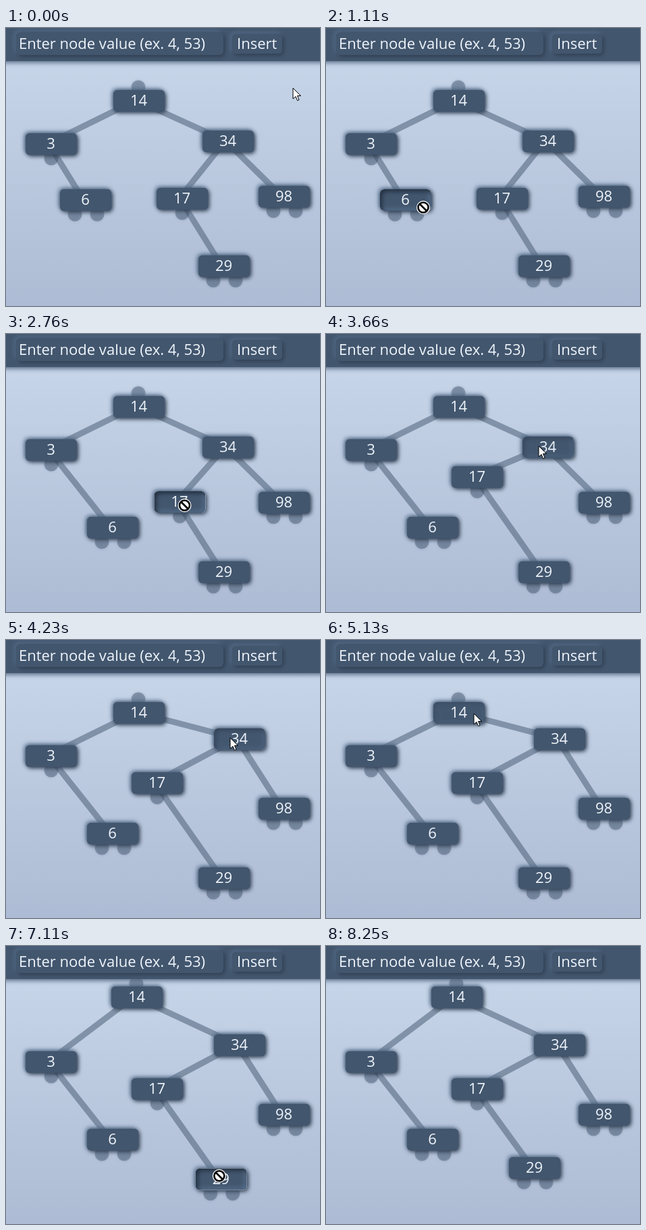
Recreate the animation shown at these times as an HTML page with a canvas. Size 465 by 412 pixels, loop 8.85 s.

```html
<!DOCTYPE html>
<html>
<head>
<meta charset="utf-8">
<style>
html, body { margin: 0; width: 100%; height: 100%; overflow: hidden; }
canvas { display: block; }
</style>
</head>
<body>
<canvas id="stage" width="465" height="412"></canvas>
<script>
const LOOP = 8850, W = 465, H = 412;
const BASE = '#42566e', LIGHT = '#57718f', DARK = '#2b394b';
const c = document.getElementById('stage').getContext('2d');

// Node centres at the start of the loop; ports are x offsets below the node.
const nodes = {
  14: { x: 197, y: 108, ports: [] },
  3: { x: 67, y: 172, parent: 14, ports: [0] },
  34: { x: 329, y: 168, parent: 14, ports: [] },
  6: { x: 118, y: 255, parent: 3, ports: [-16, 17] },
  17: { x: 261, y: 253, parent: 34, ports: [0] },
  98: { x: 412, y: 250, parent: 34, ports: [-16, 17] },
  29: { x: 323, y: 353, parent: 17, ports: [-16, 17] }
};

const drags = [
  { id: 6, hover: 800, press: 930, start: 1140, end: 1680, release: 1700, dx: 40, dy: 32 },
  { id: 17, hover: 1920, press: 2520, start: 2640, end: 3270, release: 3290, dx: -37, dy: -41 },
  { id: 34, hover: 3570, press: 3720, start: 3800, end: 4150, release: 4170, dx: 17, dy: -21 },
  { id: 14, hover: 5080, press: 5160, start: 5190, end: 5430, release: 5880, dx: -3, dy: -32 },
  { id: 29, hover: 6720, press: 6850, start: 6980, end: 7340, release: 7560, dx: -14, dy: -24 }
];

// Pointer moves: start, end, target x, y and an optional bend point.
const moves = [
  [10, 840, 136, 260, 330, 400],
  [960, 1110, 144, 266],
  [1140, 1680, 184, 298],
  [1700, 1800, 191, 278],
  [1810, 1980, 245, 250],
  [1990, 2370, 268, 258],
  [2640, 3270, 231, 217],
  [3390, 3640, 315, 166],
  [3800, 4150, 332, 145],
  [4300, 5130, 219, 109],
  [5190, 5430, 216, 77],
  [6160, 6850, 320, 348],
  [6980, 7340, 306, 324],
  [7840, 8250, 472, 102]
];

const ramp = (t, a, b) => Math.min(1, Math.max(0, (t - a) / (b - a)));
const ease = (t, a, b) => { const u = ramp(t, a, b); return u * u * (3 - 2 * u); };

function pointerAt(t) {
  let x = 425, y = 89;
  for (const [a, b, tx, ty, bx = (x + tx) / 2, by = (y + ty) / 2] of moves) {
    if (t < a) break;
    const u = ease(t, a, b), v = 1 - u;
    x = v * v * x + 2 * u * v * bx + u * u * tx;
    y = v * v * y + 2 * u * v * by + u * u * ty;
    if (t < b) break;
  }
  return { x, y };
}

function layoutAt(t) {
  const layout = {};
  for (const id in nodes) layout[id] = { ...nodes[id], sunk: 0 };
  for (const d of drags) {
    const n = layout[d.id], u = ease(t, d.start, d.end);
    n.x += d.dx * u;
    n.y += d.dy * u;
    n.sunk = (ramp(t, d.hover, d.hover + 120) + ramp(t, d.press, d.press + 120)) / 2
      * (1 - ramp(t, d.release, d.release + 110));
  }
  return layout;
}

function shadow(color, offset, blur) {
  c.shadowColor = color;
  c.shadowOffsetX = c.shadowOffsetY = offset;
  c.shadowBlur = blur;
}

function roundRect(x, y, w, h, r) {
  c.beginPath();
  c.roundRect(x, y, w, h, r);
}

function raised(x, y, w, h, r, blur) {
  c.save();
  c.fillStyle = BASE;
  roundRect(x, y, w, h, r);
  for (const [color, offset] of [[LIGHT, -2], [DARK, 2]]) {
    shadow(color, offset, blur);
    c.fill();
  }
  c.restore();
}

function inset(x, y, w, h, r, amount) {
  c.save();
  c.globalAlpha = amount;
  roundRect(x, y, w, h, r);
  c.clip();
  c.beginPath();
  c.rect(x - 30, y - 30, w + 60, h + 60);
  c.roundRect(x, y, w, h, r);
  for (const [color, offset] of [[LIGHT, -3], ['#1f2b3b', 3]]) {
    shadow(color, offset, 7);
    c.fill('evenodd');
  }
  c.restore();
}

function label(text, x, y, align) {
  c.fillStyle = '#f0f5fb';
  c.font = '22px "Open Sans", "Noto Sans", sans-serif';
  c.textAlign = align;
  c.fillText(text, x, y);
}

function drawLinks(layout) {
  c.strokeStyle = 'rgba(66,86,110,.5)';
  c.lineWidth = 9;
  for (const n of Object.values(layout)) {
    if (!n.parent) continue;
    const p = layout[n.parent];
    c.beginPath();
    c.moveTo(p.x - 4, p.y - 1);
    c.lineTo(n.x - 4, n.y - 1);
    c.stroke();
  }
}

function drawPort(x, y) {
  c.save();
  shadow('rgba(66,86,110,.5)', 0, 4);
  c.fillStyle = 'rgba(66,86,110,.45)';
  c.beginPath();
  c.arc(x, y, 10.5, 0, 7);
  c.fill();
  c.restore();
}

function drawNode(id, n) {
  const x = n.x - 38, y = n.y - 16;
  if (!n.parent) drawPort(n.x - 1, y - 4);
  for (const dx of n.ports) drawPort(n.x + dx, n.y + 21);
  raised(x, y, 76, 32, 6, 6);
  if (n.sunk) inset(x, y, 76, 32, 6, n.sunk);
  label(id, n.x - .5, n.y + 7, 'center');
}

function drawHeader() {
  c.save();
  c.fillStyle = BASE;
  shadow('#4a5f7a', 2, 7);
  c.fillRect(-20, -20, W + 40, 69);
  c.restore();
  raised(15, 6, 307, 34, 6, 6);
  raised(335, 9, 74, 29, 5, 6);
  label('Enter node value (ex. 4, 53)', 19, 31, 'left');
  label('Insert', 342, 31, 'left');
}

function drawArrow() {
  c.beginPath();
  for (const [x, y] of [[0, 0], [0, 16], [4, 12.5], [6.5, 18.5], [9, 17.5], [6.5, 11.5], [11.5, 11.5]]) c.lineTo(x, y);
  c.closePath();
  c.fillStyle = '#fff';
  c.fill();
  c.lineWidth = 1;
  c.strokeStyle = '#000';
  c.stroke();
}

function drawBlocked() {
  c.fillStyle = '#fff';
  c.beginPath();
  c.arc(0, 0, 10, 0, 7);
  c.fill();
  c.strokeStyle = '#000';
  c.lineWidth = 2.6;
  c.beginPath();
  c.arc(0, 0, 7.5, 0, 7);
  c.moveTo(-5, -5);
  c.lineTo(5, 5);
  c.stroke();
}

const sky = c.createLinearGradient(0, 49, 0, H);
sky.addColorStop(0, '#c6d5e8');
sky.addColorStop(1, '#adbbd4');

function draw(t) {
  c.fillStyle = sky;
  c.fillRect(0, 0, W, H);
  const layout = layoutAt(t);
  drawLinks(layout);
  for (const id in layout) drawNode(id, layout[id]);
  drawHeader();
  const p = pointerAt(t);
  c.save();
  c.translate(p.x, p.y);
  if (drags.some(d => t >= d.press + 60 && t < d.release)) drawBlocked();
  else drawArrow();
  c.restore();
}

function frame() {
  draw(performance.now() % LOOP);
  requestAnimationFrame(frame);
}
frame();
</script>
</body>
</html>
```
